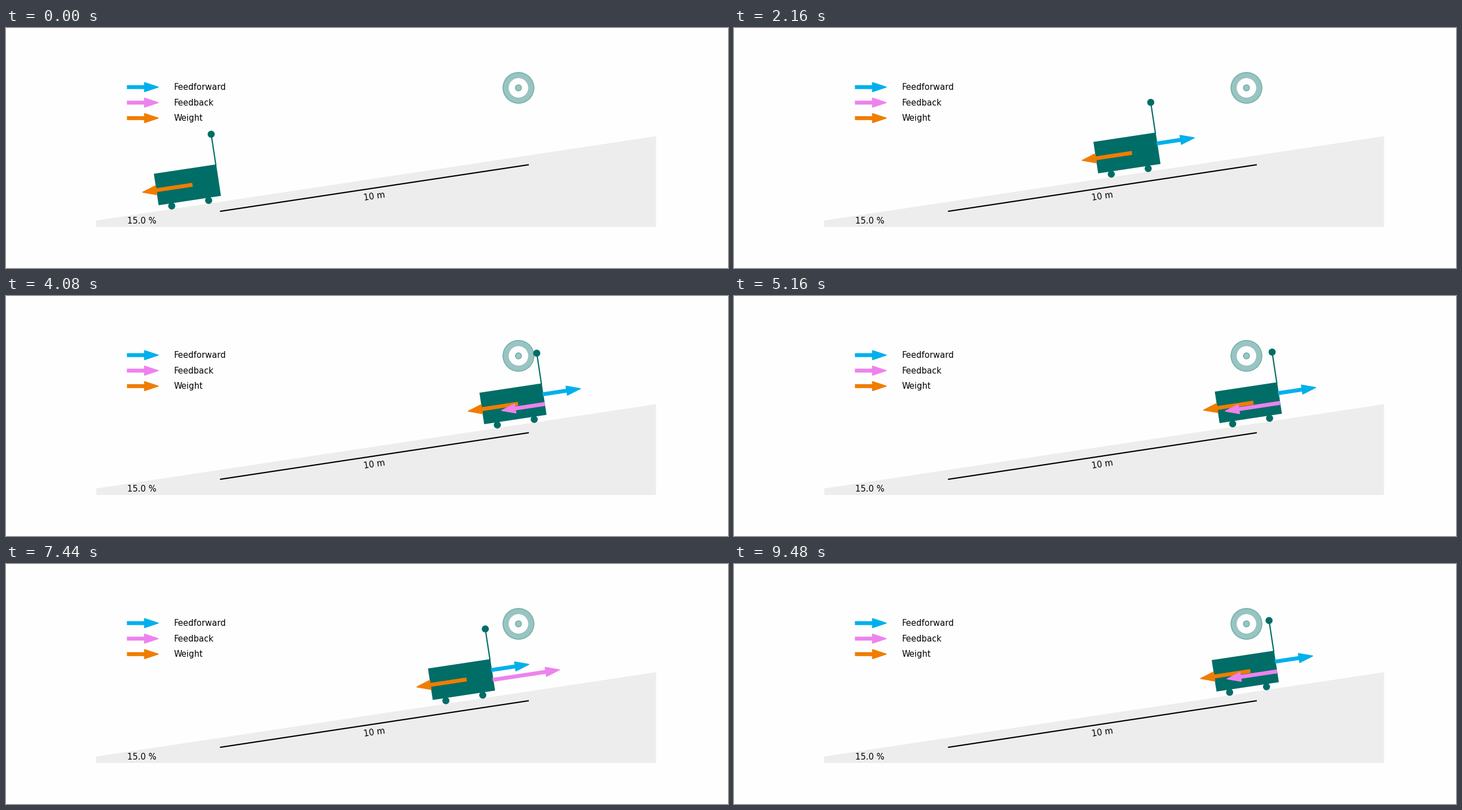
These frames come from a looping animation (1280 by 427 pixels, 9.6 s). A matplotlib script:

```python
import numpy as np
import matplotlib.pyplot as plt
from matplotlib.animation import FuncAnimation
from matplotlib.patches import Circle, FancyArrow, Polygon, Rectangle
from matplotlib.transforms import Affine2D

W, H, DPI = 1280, 427, 128
FRAMES, STEP = 80, 120
PT = 72 / DPI                 # points per pixel
M = 55.14                     # pixels per metre
SLOPE = 0.15                  # radians
EDGE = 1.48 * PT
STROKE = 2.2 * PT
FONT = 14.8 * PT

TEAL, BLUE, PINK, ORANGE = "#006d66", "#00b0ec", "#ee82ee", "#f07d00"
BACK = "#fefefe"

START, GOAL = 321.6, 866.3    # cart centre, pixels
GAIN = 1.61
PUSH, BRAKE = 345, -283

plt.rcParams["font.family"] = "DejaVu Sans"
fig = plt.figure(figsize=(W / DPI, H / DPI), dpi=DPI, facecolor=BACK)
ax = fig.add_axes([0, 0, 1, 1])
ax.set_xlim(0, W)
ax.set_ylim(H, 0)
ax.axis("off")

pose = Affine2D()
on_cart = pose + ax.transData


def cart_x(t):
    """Push off, coast uphill, brake, then swing around the balance point."""
    if t < 0.55:
        return START + 221.5 * max(t - 0.048, 0) ** 2
    if t < 2.47:
        s = t - 1.32
        return 539.8 + 199.3 * s - 15 * s * s
    if t < 2.80:
        s = t - 2.47
        return 749.2 + 164.8 * s - 192.5 * s * s
    return 853.55 + 74.8 * np.sin(1.4796 * t - 5.387)


def feedback_force(t, x):
    if 0.05 < t < 0.55:
        return PUSH
    if 2.47 < t < 2.80:
        return BRAKE
    return GAIN * (GOAL - x) if t > 2.35 else 0


def place(x):
    y = 279.0 - np.tan(SLOPE) * (x - START)
    pose.clear().scale(M, -M).rotate(-SLOPE).translate(x, y)


def arrow(x, y, dx, color, unit=1, **kw):
    return ax.add_patch(FancyArrow(x, y, dx, 0, width=0.1 * unit,
                                   color=color, lw=EDGE, **kw))


def disc(x, y, r, color, **kw):
    ax.add_patch(Circle((x, y), r, color=color, lw=EDGE, **kw))


# Ramp and scale bar
ax.add_patch(Polygon([(160, 342.5), (1152.3, 192.5), (1152.3, 354), (160, 354)],
                     fc="#ededed", lw=0))
ax.plot([380.5, 925.8], [326, 243.4], color="black", lw=STROKE)
ax.text(653, 300, "10 m", size=FONT, rotation=np.degrees(SLOPE),
        ha="center", va="center")
ax.text(215.1, 348, "15.0 %", size=FONT)

# Legend
rows = [("Feedforward", BLUE), ("Feedback", PINK), ("Weight", ORANGE)]
for i, (label, color) in enumerate(rows):
    y = 105.2 + i * M / 2
    arrow(215.1, y, M, color, unit=M, length_includes_head=True)
    ax.text(297.9, round(y + 5), label, size=FONT)

# Goal marker
disc(908.5, 106.5, 0.5 * M, TEAL, alpha=0.4)
disc(908.5, 106.5, 0.3 * M, BACK)
disc(908.5, 106.5, 0.1 * M, TEAL, alpha=0.4)

# Cart, in metres about its centre
ax.add_patch(Rectangle((-1, -0.5), 2, 1, color=TEAL, lw=EDGE, transform=on_cart))
ax.plot([1, 1], [0.5, 1.5], color=TEAL, lw=STROKE, transform=on_cart)
for p, q in [(-0.6, -0.6), (0.6, -0.6), (1, 1.5)]:
    disc(p, q, 0.1, TEAL, transform=on_cart)

arrow(0.148, -0.022, -1.161, ORANGE, transform=on_cart)
forward = arrow(1, 0.16, 0.77, BLUE, transform=on_cart)
feedback = arrow(1, -0.16, 1, PINK, transform=on_cart)


def update(i):
    t = i * STEP / 1000
    x = cart_x(t)
    place(x)
    force = feedback_force(t, x)
    forward.set_visible(i > 0)
    feedback.set_visible(force != 0)
    if force:
        feedback.set_data(dx=force / M)
    return forward, feedback


anim = FuncAnimation(fig, update, frames=FRAMES, interval=STEP,
                     init_func=lambda: update(0), repeat=True, repeat_delay=0)
plt.show()
```
